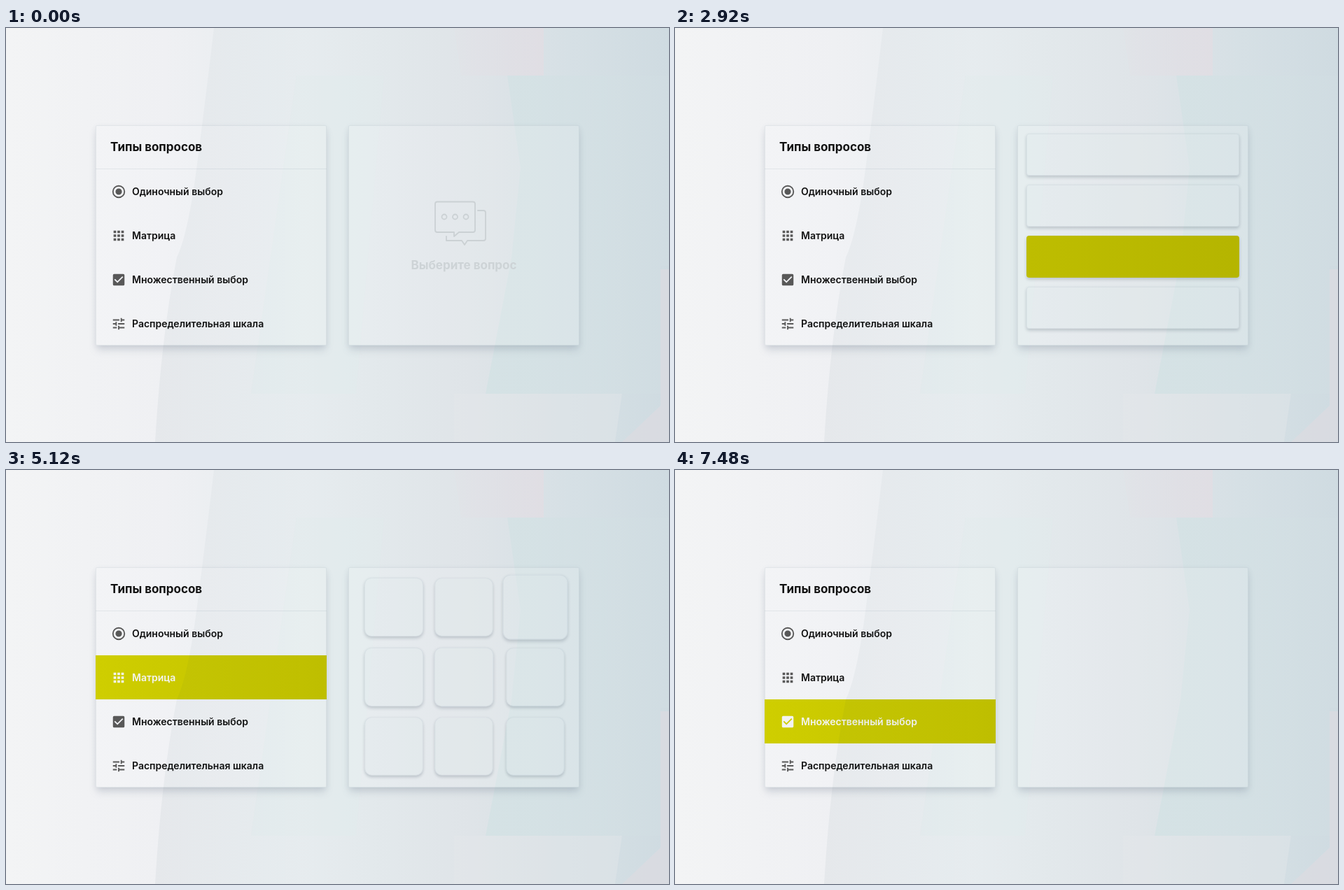
These frames come from a looping animation (947x592 px, 8 s). An HTML page:

```html
<!DOCTYPE html>
<html lang="ru">
<head>
<meta charset="utf-8">
<style>
  html, body { margin: 0; width: 100%; height: 100%; overflow: hidden; background: #e6ebee; }
  body, svg text { font-family: Inter, "Open Sans", sans-serif; }
  #stage { position: absolute; left: 0; top: 0; width: 947px; height: 592px; overflow: hidden; }
  #stage div, #stage svg { position: absolute; }
  .panel {
    top: 139px; width: 330px; height: 315px; overflow: hidden; border-radius: 2px;
    background: rgba(255, 255, 255, .13);
    box-shadow: inset 0 0 0 1px rgba(110, 130, 145, .13), 0 8px 11px -2px rgba(95, 110, 130, .22), 0 2px 7px rgba(95, 110, 130, .09);
  }
  .title { left: 21px; top: 20px; font: 700 17px/22px Inter, "Open Sans", sans-serif; color: #111; }
  .rule { top: 62px; width: 330px; height: 1px; background: rgba(110, 130, 145, .13); }
  .item { width: 330px; height: 63px; }
  .mark { width: 330px; background: linear-gradient(90deg, #cfce00, #c9c800 45%, #bebe00); }
  .item svg { left: 22px; top: 20.5px; width: 22px; height: 22px; }
  .label { left: 52px; white-space: nowrap; font: 600 14px/63px Inter, "Open Sans", sans-serif; }
  .card {
    box-shadow: inset 0 0 0 1px rgba(120, 140, 155, .1), 0 3px 4px rgba(90, 105, 120, .22), 0 1px 4px rgba(90, 105, 120, .08);
    background: rgba(214, 226, 230, .16);
  }
  .fill { inset: 0; border-radius: inherit; opacity: 0; background: linear-gradient(90deg, #bebd00, #b5b500); }
  .option { left: 13px; width: 304px; height: 60px; border-radius: 4px; }
  .cell { width: 84px; height: 84px; border-radius: 10px; }
</style>
</head>
<body>
<div id="stage">
  <svg width="947" height="592">
    <defs>
      <linearGradient id="sky">
        <stop offset="0" stop-color="#f3f4f5"/><stop offset=".24" stop-color="#eff0f3"/>
        <stop offset=".4" stop-color="#e8edf0"/><stop offset=".55" stop-color="#e3e9ec"/>
        <stop offset=".7" stop-color="#dfe4e8"/><stop offset=".85" stop-color="#d6e0e5"/>
        <stop offset="1" stop-color="#cfdbe1"/>
      </linearGradient>
      <linearGradient id="teal">
        <stop offset="0" stop-color="#d2e2e4" stop-opacity=".75"/><stop offset="1" stop-color="#d2dfe3" stop-opacity=".3"/>
      </linearGradient>
      <linearGradient id="pink">
        <stop offset="0" stop-color="#e4dfe5" stop-opacity=".2"/><stop offset="1" stop-color="#e2dde3" stop-opacity=".8"/>
      </linearGradient>
    </defs>
    <rect width="947" height="592" fill="url(#sky)"/>
    <path d="M415 68H540L500 523H350Z" fill="#dfeaec" opacity=".3"/>
    <path d="M640 0H768V68H650Z" fill="url(#pink)"/>
    <path d="M716 68H947V340H935V523H685L722 330L735 200Z" fill="url(#teal)"/>
    <path d="M935 345H947V592H880L935 540Z" fill="#dddce2" opacity=".7"/>
    <path d="M640 523H880L870 592H640Z" fill="#e4e5e9" opacity=".4"/>
  </svg>

  <div class="panel" id="menu" style="left:128px">
    <div class="title">Типы вопросов</div>
    <div class="rule"></div>
  </div>

  <div class="panel" id="view" style="left:489px">
    <svg id="prompt" width="330" height="315" viewBox="489 139 330 315" fill="none" stroke="#cbd1d4" stroke-width="1.8" stroke-linejoin="round" stroke-linecap="round">
      <path d="M616 248.500H667Q670 248.500 670 251.500V289Q670 292 667 292H647L640 298V292H616Q613 292 613 289V251.500Q613 248.500 616 248.500Z"/>
      <path d="M674 261H682Q685 261 685 264V301Q685 304 682 304H659L655 310L651 304H629V298"/>
      <circle cx="626" cy="270" r="3.500"/><circle cx="641.500" cy="270" r="3.500"/><circle cx="657" cy="270" r="3.500"/>
      <text x="654" y="345" text-anchor="middle" font-size="17" font-weight="700" fill="#cdd3d6" stroke="none">Выберите вопрос</text>
    </svg>
  </div>

  <svg width="947" height="592">
    <linearGradient id="shade" gradientUnits="userSpaceOnUse" x1="215" x2="430">
      <stop offset="0" stop-color="#123c46" stop-opacity=".045"/><stop offset="1" stop-color="#123c46" stop-opacity="0"/>
    </linearGradient>
    <path d="M297 0Q284 110 272 202T244 328Q222 440 213 592H430V0Z" fill="url(#shade)"/>
  </svg>
</div>

<script>
const LOOP = 8000;
const menu = document.getElementById('menu');
const view = document.getElementById('view');
const promptBox = document.getElementById('prompt');

const dots = [4, 10, 16].flatMap(y => [4, 10, 16].map(x => `M${x} ${y}h4v4h-4z`)).join('');
const types = [
  { text: 'Одиночный выбор', on: [650, 390], off: [2640, 280],
    icon: 'M12 7a5 5 0 1 0 0 10a5 5 0 1 0 0-10zM12 2a10 10 0 1 0 0 20a10 10 0 1 0 0-20zM12 4a8 8 0 1 1 0 16a8 8 0 1 1 0-16z' },
  { text: 'Матрица', on: [2920, 360], off: [6310, 270], icon: dots },
  { text: 'Множественный выбор', on: [6600, 360], off: [LOOP, 1],
    icon: 'M5 3H19Q21 3 21 5V19Q21 21 19 21H5Q3 21 3 19V5Q3 3 5 3zM10 17L19 8L17.590 6.580L10 14.170L6.410 10.590L5 12z' },
  { text: 'Распределительная шкала', on: [LOOP, 1], off: [LOOP, 1],
    icon: 'M3 17v2h6v-2zM3 5v2h10V5zM13 21v-2h8v-2h-8v-2h-2v6zM7 9v2H3v2h4v2h2V9zM21 13v-2H11v2zM15 9h2V7h4V5h-4V3h-2z' }
];

function add(parent, cls, left, top, html = '') {
  const el = document.createElement('div');
  el.className = cls;
  if (left !== null) el.style.left = left + 'px';
  el.style.top = top + 'px';
  el.innerHTML = html;
  parent.append(el);
  return el;
}

const items = types.map((type, i) => {
  const el = add(menu, 'item', 0, 63 + 63 * i,
    `<div class="mark"></div><svg viewBox="0 0 24 24"><path fill-rule="evenodd" d="${type.icon}"/></svg><div class="label">${type.text}</div>`);
  const [mark, icon, label] = el.children;
  return { ...type, mark, icon, label };
});

const fill = '<div class="fill"></div>';
const options = [0, 1, 2, 3].map(i => add(view, 'card option', null, 12 + 73 * i, fill));

const delays = [0, 200, 400, 40, 285, 190, 170, 210, 220];
const picks = { 4: 5720, 5: 5880, 7: 6040 };
const cells = delays.map((_, i) =>
  add(view, 'card cell', [23, 123, 225][i % 3], [15, 115, 214][Math.floor(i / 3)], fill));

const progress = (t, start, length) => Math.min(1, Math.max(0, (t - start) / length));
const easeOut = p => 1 - (1 - p) ** 2;
const cubicOut = p => 1 - (1 - p) ** 3;
const backIn = p => 2.7 * p ** 3 - 1.7 * p * p;
const spring = t => t <= 0 ? 0 : 1 - Math.exp(-.0125 * t) * Math.cos(Math.PI * t / 200);
const gray = (from, to, p) => {
  const v = Math.round(from + (to - from) * p);
  return `rgb(${v},${v},${v})`;
};

function draw(t) {
  for (const item of items) {
    const p = easeOut(progress(t, ...item.on)) * (1 - easeOut(progress(t, ...item.off)));
    item.mark.style.height = 63 * p + 'px';
    item.icon.style.fill = gray(88, 243, p);
    item.label.style.color = gray(17, 243, p);
  }
  promptBox.style.opacity = 1 - progress(t, 650, 350);

  options.forEach((el, i) => {
    const enter = cubicOut(progress(t, 1300 + 100 * i, 470));
    const leave = progress(t, 3760 + 80 * i, 330);
    el.style.transform = `translateY(${320 * (1 - enter) - 320 * leave}px)`;
    el.style.visibility = enter > 0 && leave < 1 ? 'visible' : 'hidden';
  });
  options[2].firstChild.style.opacity = progress(t, 2200, 200);

  cells.forEach((el, i) => {
    const leave = backIn(progress(t, 6820 + delays[i] * .6, 400));
    const scale = Math.max(0, spring(t - 4550 - delays[i]) * (1 - leave));
    el.style.transform = `scale(${scale})`;
    if (picks[i]) el.firstChild.style.opacity = progress(t, picks[i], 200);
  });
}

const origin = performance.now();
function tick() {
  draw((performance.now() - origin) % LOOP);
  requestAnimationFrame(tick);
}
tick();
</script>
</body>
</html>
```
